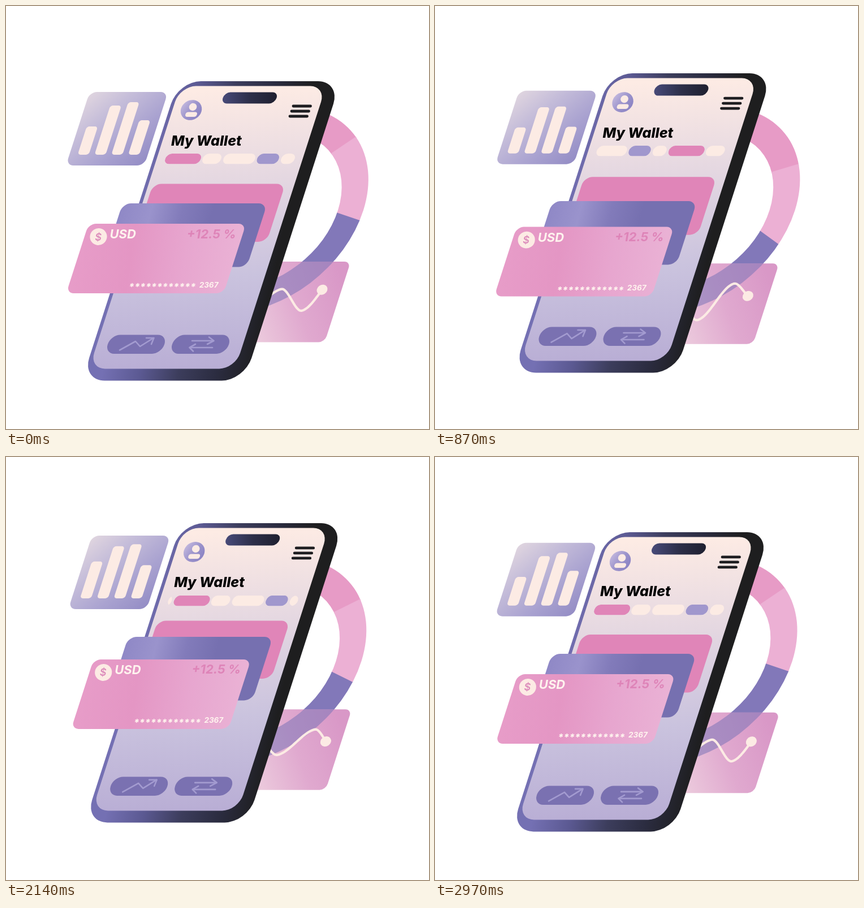
An HTML page with a canvas that plays this animation: 748 by 748 pixels, repeating every 3 s.

```html
<!DOCTYPE html>
<html lang="en">
<head>
<meta charset="utf-8">
<title>My Wallet</title>
<style>
  html, body { margin: 0; height: 100%; overflow: hidden; background: #fff; }
  canvas { display: block; width: 748px; height: 748px; }
</style>
</head>
<body>
<canvas id="stage"></canvas>
<script>
const LOOP = 3000, SLANT = 0.322;
const CREAM = '#fcebe4', PINK = '#e085b8', PURPLE = '#7a71b1';
const canvas = document.getElementById('stage');
const ctx = canvas.getContext('2d');
const dpr = window.devicePixelRatio || 1;
canvas.width = canvas.height = 748 * dpr;
let now = 0;

// Sine swing, zero at the loop start, highest at the peak time
function swing(amp, peak) {
  const turn = 2 * Math.PI / LOOP;
  return amp * (Math.cos(turn * (now - peak)) - Math.cos(turn * peak));
}

// Eased move through [position, value] stops; ends are held
function ease(stops, pos, curve) {
  let i = 0;
  while (i < stops.length - 2 && pos > stops[i + 1][0]) i++;
  const [a, from] = stops[i], [b, to] = stops[i + 1];
  const u = Math.min(1, Math.max(0, (pos - a) / (b - a)));
  return from + (to - from) * u * u * (3 - 2 * u);
}

function gradient(x0, y0, x1, y1, ...colors) {
  const g = ctx.createLinearGradient(x0, y0, x1, y1);
  colors.forEach((c, i) => g.addColorStop(i / (colors.length - 1), c));
  return g;
}

// Sheared rounded box given by its visible bounds
function slabPath(left, top, right, bottom, r) {
  const h = bottom - top;
  const over = r * (1 + SLANT - Math.hypot(1, SLANT));
  const x = left - over, w = right + over - SLANT * h - x;
  ctx.save();
  ctx.transform(1, 0, -SLANT, 1, SLANT * bottom, 0);
  ctx.beginPath();
  ctx.roundRect(x, top, w, h, r);
  ctx.restore();
}

function slab(left, top, right, bottom, r, fill) {
  slabPath(left, top, right, bottom, r);
  ctx.fillStyle = fill;
  ctx.fill();
}

function dot(x, y, rx, ry, fill) {
  ctx.beginPath();
  ctx.ellipse(x, y, rx, ry, -0.6, 0, 2 * Math.PI);
  ctx.fillStyle = fill;
  ctx.fill();
}

function line(color, width, ...points) {
  ctx.beginPath();
  points.forEach(([x, y]) => ctx.lineTo(x, y));
  ctx.strokeStyle = color;
  ctx.lineWidth = width;
  ctx.stroke();
}

function text(str, x, y, size, fill, align = 'left', weight = 700) {
  ctx.font = `italic ${weight} ${size}px Inter, sans-serif`;
  ctx.textAlign = align;
  ctx.fillStyle = fill;
  ctx.fillText(str, x, y);
}

// Parts swing along the slant
function drift(amp, peak, draw) {
  const dy = swing(amp, peak);
  ctx.save();
  ctx.translate(-SLANT * dy, dy);
  draw();
  ctx.restore();
}

function ring() {
  ctx.save();
  ctx.translate(swing(4.2, 800), 0);
  const shape = new Path2D();
  for (const r of [182, 137]) {
    const circle = new Path2D();
    circle.arc(0, 0, r, 0, 2 * Math.PI);
    shape.addPath(circle, new DOMMatrix([1, 0, -0.315, 1, 450, 361]));
  }
  ctx.clip(shape, 'evenodd');
  const start = ease([[0, -34], [960, -16.2], [2000, -25.5], [2700, -34]], now);
  const wedge = (from, to, fill) => {
    ctx.beginPath();
    ctx.moveTo(475, 328);
    ctx.arc(475, 328, 400, from * Math.PI / 180, to * Math.PI / 180);
    ctx.fillStyle = fill;
    ctx.fill();
  };
  wedge(start - 120, start + 1, '#e79bc6');
  wedge(start, start + 53.5, '#ecb0d4');
  wedge(start + 52.7, start + 175, '#8278b9');
  ctx.restore();
}

// Alternating peaks and troughs, repeating every 200 px
const WAVE = [[421, 62], [487, 32], [523, 78.5], [588, 29], [621, 62]];
function waveY(x) {
  const u = 421 + (x + 200 * now / LOOP - 421) % 200;
  return 452 + ease(WAVE, u) + 0.23 * (559 - x);
}

function graphCard() {
  const swingArgs = [4.7, 650];
  const outline = () => slabPath(370, 452, 606.5, 594.5, 11);
  drift(...swingArgs, () => {
    outline();
    ctx.fillStyle = gradient(430, 560, 600, 500, '#eccbdd', '#e0a9cf', '#d998c7');
    ctx.fill();
  });
  // The ring shows through the card
  ctx.save();
  drift(...swingArgs, outline);
  ctx.clip();
  ctx.globalAlpha = 0.58;
  ring();
  ctx.restore();
  drift(...swingArgs, () => {
    const end = 559 - 4.7 * Math.sin(2 * Math.PI * now / LOOP);
    const points = [];
    for (let x = end; x > 430; x -= 2) points.push([x, waveY(x)]);
    line(CREAM, 4.2, ...points);
    dot(...points[0], 10, 8.5, CREAM);
  });
}

const CHIPS = [[0, 64, PINK], [66, 100, CREAM], [103, 160, CREAM], [162.5, 202, '#a097cd'], [205, 230, CREAM]];
function chips() {
  ctx.save();
  slabPath(281, 261, 511.5, 279.5, 9);
  ctx.clip();
  const scroll = ease([[100, 0], [960, 109], [2000, 222], [3000, 233]], now);
  for (const lap of [0, 233])
    for (const [from, to, fill] of CHIPS) {
      const x = 281 - scroll + lap;
      slab(x + from, 261, x + to, 279.5, 9, fill);
    }
  ctx.restore();
}

function phone() {
  slab(145, 133, 581, 662.5, 40,
    gradient(220, 400, 480, 452, '#7470b3', '#5b5992', '#3c3d5c', '#2b2c40', '#1e1e1f'));
  slab(154.5, 141.5, 558.5, 641.5, 28,
    gradient(330, 150, 350, 640, '#fdebe4', '#e4d7e1', '#cac3de', '#b9aed5'));
  slab(383, 152.5, 479, 172.5, 10, gradient(383, 0, 479, 0, '#474a79', '#2d2f49', '#1f2030'));

  dot(327.5, 184, 19.5, 17, gradient(312, 172, 344, 198, '#c4b9de', '#9a92cb', '#8880c2'));
  dot(330.5, 178.5, 7, 6.5, CREAM);
  slab(317, 187.5, 338, 196, 4.2, CREAM);
  for (let i = 0; i < 3; i++)
    line('#1d1d20', 4.8, [508 - 3 * i, 177 + 9 * i], [538.5 - 3 * i, 177 + 9 * i]);

  text('My Wallet', 292, 246.5, 25, '#000', 'left', 800);
  chips();

  slab(179, 581.5, 281, 615, 16.7, PURPLE);
  slab(293, 581.5, 395, 615, 16.7, PURPLE);
  const ink = '#a39bd0';
  line(ink, 2.6, [201, 608.5], [229, 593], [237, 602], [261, 587]);
  line(ink, 2.6, [248, 587], [261.5, 587], [257, 598]);
  line(ink, 2.6, [329, 592], [367, 592]);
  line(ink, 2.6, [359, 585.5], [367.5, 592], [356, 598]);
  line(ink, 2.6, [365, 604], [325, 604]);
  line(ink, 2.6, [335, 598], [324.5, 604], [331, 610.5]);
}

function backCard() {
  slab(231, 314.5, 490, 417, 15, PINK);
}

function middleCard() {
  slab(174, 349, 458, 461.5, 15,
    gradient(195, 385, 350, 425, '#8f88c6', '#9a93cc', '#827bba', '#7670b0'));
}

function frontCard() {
  slab(110, 385, 421, 508, 13,
    gradient(125, 430, 410, 470, '#e79cc8', '#e496c4', '#e7a6cf', '#eab2d5'));
  dot(163.5, 408, 15.2, 14.8, CREAM);
  text('$', 163, 414.5, 18, '#dc8cbb', 'center', 600);
  text('USD', 183.5, 411, 22, '#fff3ee');
  text('+12.5 %', 406.5, 410.5, 22, '#de84b8', 'right');
  for (let i = 0; i < 3; i++)
    text('****', 217 + 39.5 * i, 503, 17, '#fff3ee', 'left', 800);
  text('2367', 375.5, 497.5, 13.5, '#fff3ee', 'right');
}

// Bars: mean height at the loop start and swing, each peaking a little later
const BARS = [[50, 11], [87, 5.5], [93, 7.3], [61, 8.7]];
function chartTile() {
  slab(109.5, 152, 283, 282, 13,
    gradient(138, 155, 245, 285, '#e3d8e0', '#c4bcd9', '#a9a2d0', '#928bc4'));
  BARS.forEach(([height, amp], i) => {
    const h = height + swing(amp, 2050 + 200 * i), x = 128 + 29.8 * i;
    slab(x, 263 - h, x + 17 + SLANT * h, 263, 5, CREAM);
  });
}

function draw() {
  ctx.setTransform(dpr, 0, 0, dpr, 0, 0);
  ctx.fillStyle = '#fff';
  ctx.fillRect(0, 0, 748, 748);
  ctx.lineCap = ctx.lineJoin = 'round';
  ring();
  graphCard();
  drift(12.2, 50, phone);
  drift(16.5, 200, backCard);
  drift(20, 375, middleCard);
  drift(19, 525, frontCard);
  drift(8.3, 350, chartTile);
}

const begin = performance.now();
function tick() {
  now = (performance.now() - begin) % LOOP;
  draw();
  requestAnimationFrame(tick);
}
tick();
</script>
</body>
</html>
```
